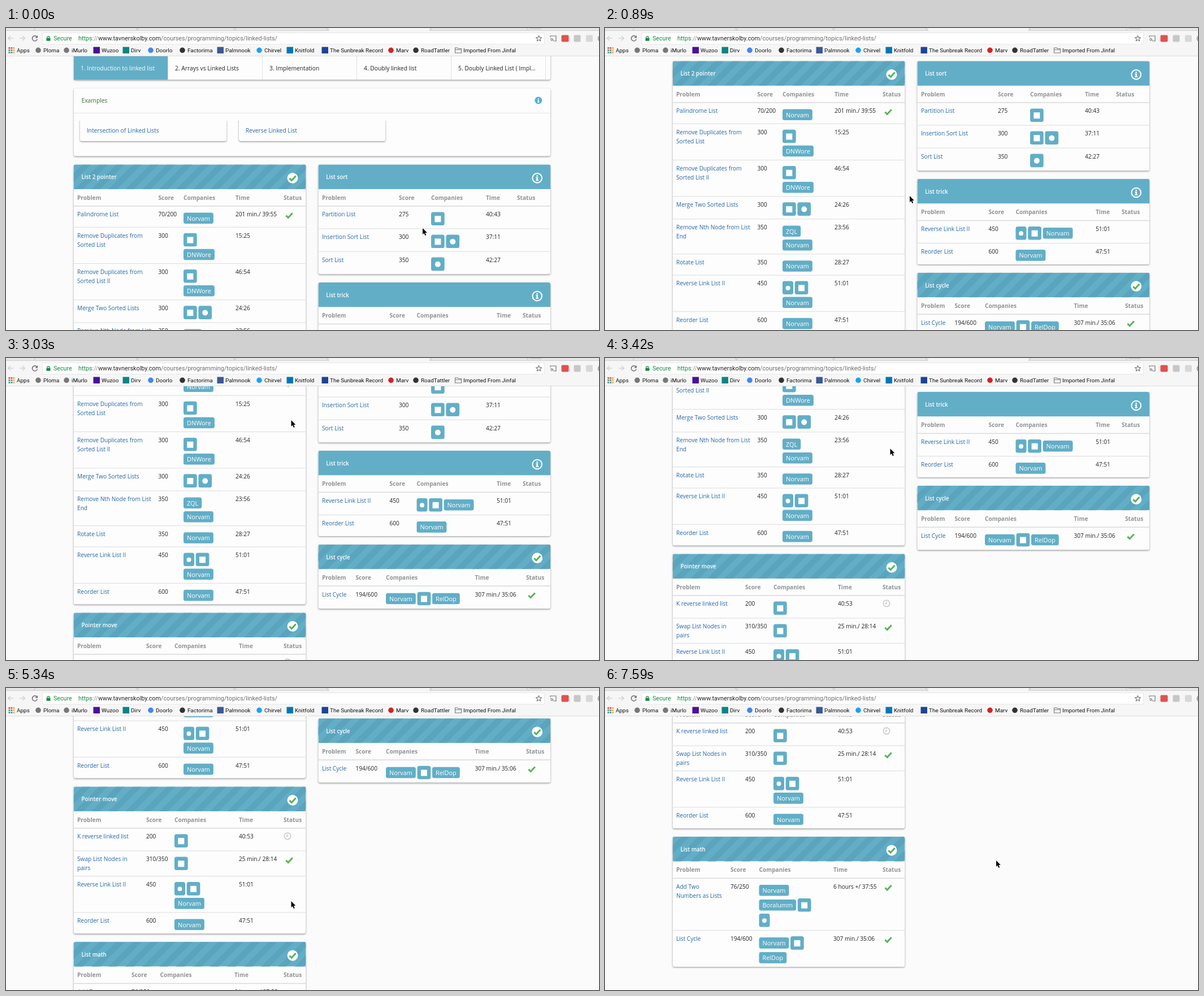
Animation of 1049x534 px, one loop 8000 ms. Source, as an HTML page with a canvas:

```html
<!DOCTYPE html>
<html lang="en">
<head>
<meta charset="utf-8">
<title>Linked lists</title>
<style>
html, body { margin: 0; width: 100%; height: 100%; overflow: hidden; background: #fbfbfb; }
canvas { display: block; width: 1049px; height: 534px; }
</style>
</head>
<body>
<canvas id="stage"></canvas>
<script>
const W = 1049, H = 534, LOOP = 8000;
const BLUE = '#62aec7', DARK = '#5ba4bd', LINK = '#2566a8', INK = '#222', GREEN = '#55b555';
const PAGE = '"Open Sans", "Noto Sans", sans-serif';
const UI = 'Roboto, Inter, sans-serif';

const canvas = document.getElementById('stage');
const c = canvas.getContext('2d', { alpha: false });
const dpr = window.devicePixelRatio || 1;
canvas.width = W * dpr;
canvas.height = H * dpr;

// The picture changes only at these moments
const ticks = [0, 150, 320, 500, 680, 870, 1060, 1240, 1390, 1540, 1690, 1840, 1990,
  2880, 3030, 3240, 3420, 3600, 3780, 3960, 4110, 4260, 4860, 5010,
  5340, 5520, 5715, 5910, 6240, 6390, 6540, 6690, 6840, 6990, 7440, 7590];

// [time, scroll]
const scrollKeys = [[0, 0], [150, 58], [500, 200], [680, 214], [1060, 152], [1990, 152],
  [2880, 212], [3030, 286], [3240, 350], [3420, 390], [3600, 396], [4260, 396],
  [4860, 468], [5010, 532], [5340, 562], [5520, 636], [5715, 702], [5910, 734],
  [6240, 736], [6690, 748]];

// [time, x, y]
const cursorKeys = [[0, 737, 354], [680, 737, 354], [1060, 341, 240], [1990, 504.5, 110],
  [3240, 504.5, 110], [3780, 504.5, 261], [4260, 504.5, 377], [6390, 504.5, 377],
  [6990, 504.5, 283], [7440, 612, 294], [7590, 692, 305]];

function track(keys, t) {
  const i = keys.findIndex(k => k[0] > t);
  if (i < 0) return keys[keys.length - 1].slice(1);
  const a = keys[i - 1], b = keys[i], u = (t - a[0]) / (b[0] - a[0]);
  return a.slice(1).map((v, j) => v + (b[j + 1] - v) * u);
}

// Badges: '#' square icon, 'o' round icon, '.' narrow round icon, '|' new line
const row = (name, score, badges, time, status = '') => ({
  lines: name.split('|'), score, time, status,
  badges: badges.split('|').map(s => s.split(' '))
});
const reverse = badges => row('Reverse Link List II', '450', badges, '51:01');
const reorder = row('Reorder List', '600', 'Norvam', '47:51');
const cycle = badges => row('List Cycle', '194/600', badges, '307 min./ 35:06', 'done');

const left = [
  { title: 'List 2 pointer', done: true, cols: [126, 269.5, 314, 406, 491], rows: [
    row('Palindrome List', '70/200', 'Norvam', '201 min./ 39:55', 'done'),
    row('Remove Duplicates from|Sorted List', '300', '#|DNWore', '15:25'),
    row('Remove Duplicates from|Sorted List II', '300', '#|DNWore', '46:54'),
    row('Merge Two Sorted Lists', '300', '# o', '24:26'),
    row('Remove Nth Node from List|End', '350', 'ZQL|Norvam', '23:56'),
    row('Rotate List', '350', 'Norvam', '28:27'),
    reverse('. #|Norvam'), reorder] },
  { title: 'Pointer move', done: true, cols: [126, 248, 298, 412, 491], rows: [
    row('K reverse linked list', '200', '#', '40:53', 'wait'),
    row('Swap List Nodes in|pairs', '310/350', '#', '25 min./ 28:14', 'done'),
    reverse('. #|Norvam'), reorder] },
  { title: 'List math', done: true, cols: [126, 222, 272.5, 404, 491], rows: [
    row('Add Two|Numbers as Lists', '76/250', 'Norvam|Boralumm #|.', '6 hours +/ 37:55', 'done'),
    cycle('Norvam #|RelDop')] }
];
const right = [
  { title: 'List sort', cols: [559, 695, 752, 849, 904], rows: [
    row('Partition List', '275', '#', '40:43'),
    row('Insertion Sort List', '300', '# o', '37:11'),
    row('Sort List', '350', 'o', '42:27')] },
  { title: 'List trick', cols: [559, 678.5, 726.5, 868, 914], rows: [
    reverse('. # Norvam'), reorder] },
  { title: 'List cycle', done: true, cols: [559, 618.5, 672, 829.5, 920], rows: [
    cycle('Norvam # RelDop')] }
];

function text(s, x, y, color = INK, size = 10.15, weight = 400, family = PAGE) {
  c.font = `${weight} ${size}px ${family}`;
  c.fillStyle = color;
  c.fillText(s, x, y + size * 0.36);
}
function rect(x, y, w, h, color) {
  c.fillStyle = color;
  c.fillRect(x, y, w, h);
}
function round(x, y, w, h, r, color) {
  c.beginPath();
  c.roundRect(x, y, w, h, r);
  c.fillStyle = color;
  c.fill();
}
function disc(x, y, r, color) {
  c.beginPath();
  c.arc(x, y, r, 0, Math.PI * 2);
  c.fillStyle = color;
  c.fill();
}
function ring(x, y, r, color, width) {
  c.beginPath();
  c.arc(x, y, r, 0, Math.PI * 2);
  c.strokeStyle = color;
  c.lineWidth = width;
  c.stroke();
}
function line(points, color, width) {
  c.beginPath();
  points.forEach(([x, y]) => c.lineTo(x, y));
  c.strokeStyle = color;
  c.lineWidth = width;
  c.stroke();
}
function card(x, y, w, h) {
  c.save();
  c.shadowColor = 'rgba(0,0,0,.42)';
  c.shadowBlur = 3 * dpr;
  c.shadowOffsetY = 1.2 * dpr;
  round(x, y, w, h, 3, '#fdfdfd');
  c.restore();
}
function check(x, y, k = 1) {
  line([[x - 5.6 * k, y + 0.2 * k], [x - 1.8 * k, y + 4 * k], [x + 5.8 * k, y - 4.2 * k]], GREEN, 3 * k);
}
function info(x, y, color, k = 1) {
  rect(x - 1.3 * k, y - 5 * k, 2.5 * k, 2.3 * k, color);
  rect(x - 2.3 * k, y - 1.6 * k, 3.5 * k, 1.5 * k, color);
  rect(x - 1.3 * k, y - 1.6 * k, 2.5 * k, 6 * k, color);
  rect(x - 2.5 * k, y + 3.1 * k, 5 * k, 1.6 * k, color);
}
function clock(x, y) {
  ring(x, y, 5.7, '#c2c2c2', 1.4);
  line([[x, y - 3.5], [x, y + 0.5], [x - 3, y + 0.5]], '#c2c2c2', 1.2);
}

const isIcon = s => s.length === 1;
function badge(s, x, y) {
  if (!isIcon(s)) {
    c.font = `400 10.9px ${PAGE}`;
    const w = c.measureText(s).width + 12;
    round(x, y - 9.8, w, 19.6, 3.5, BLUE);
    text(s, x + 6, y + 0.4, '#fff', 10.9);
    return w;
  }
  const w = s === '.' ? 19 : 23.7;
  round(x, y - 11.8, w, 23.6, 3.5, BLUE);
  if (s === '#') rect(x + w / 2 - 5.5, y - 5, 11, 11, '#fff');
  else disc(x + w / 2, y + 0.4, s === 'o' ? 5 : 4, '#fff');
  return w;
}

// Vertical centres of the badge lines, relative to the row top
function badgeLines(badges) {
  let y = 0, prev = false;
  return badges.map((b, i) => {
    const icon = b.some(isIcon);
    if (!i) y = icon ? 22.3 : 21.3;
    else y += icon && prev ? 27 : icon || prev ? 26 : 24.5;
    prev = icon;
    return y;
  });
}
function rowHeight(r) {
  const ys = badgeLines(r.badges), icon = r.badges[ys.length - 1].some(isIcon);
  return Math.max(ys[ys.length - 1] + (icon ? 17.8 : 16), r.lines.length * 16 + 12.6);
}

function drawRow(r, cols, y) {
  r.lines.forEach((s, i) => text(s, cols[0], y + 14.8 + i * 16, LINK));
  text(r.score, cols[1], y + 14.8);
  text(r.time, cols[3], y + 14.8);
  badgeLines(r.badges).forEach((by, i) => {
    let x = cols[2];
    for (const s of r.badges[i]) x += badge(s, x, y + by) + 2.7;
  });
  if (r.status === 'done') check(cols[4] + 10, y + 16.5);
  if (r.status === 'wait') clock(cols[4] + 7, y + 14);
}

function header(p, x, y, w) {
  c.save();
  c.beginPath();
  c.roundRect(x, y, w, 43.5, [3, 3, 0, 0]);
  c.clip();
  rect(x, y, w, 43.5, BLUE);
  if (p.done) {
    for (let s = 15; s < w + 44; s += 30) {
      c.beginPath();
      [[s, 0], [s + 15, 0], [s - 29, 44], [s - 44, 44]].forEach(([a, b]) => c.lineTo(x + a, y + b));
      c.fillStyle = DARK;
      c.fill();
    }
  }
  c.restore();
  text(p.title, x + 13.7, y + 22.3, '#fff', 9.8, 600);
  const ix = x + w - 23.3, iy = y + 24;
  if (p.done) {
    disc(ix, iy, 9.4, '#fff');
    check(ix, iy + 0.2, 0.98);
  } else {
    ring(ix, iy, 8.3, '#fff', 2);
    info(ix, iy, '#fff');
  }
}

function column(panels, x, top) {
  const w = 410.5;
  for (const p of panels) {
    const h = 73.5 + p.rows.reduce((sum, r) => sum + rowHeight(r), 0);
    card(x, top, w, h);
    header(p, x, top, w);
    ['Problem', 'Score', 'Companies', 'Time', 'Status']
      .forEach((s, i) => text(s, p.cols[i], top + 58.5, '#8f9294', 10.15, 700));
    rect(x, top + 72.7, w, 1.5, '#dadada');
    let y = top + 73.5;
    p.rows.forEach((r, i) => {
      if (i) rect(x, y - 0.5, w, 1, '#dcdcdc');
      drawRow(r, p.cols, y);
      y += rowHeight(r);
    });
    top += h + 14.8;
  }
}

function topics() {
  card(120, 20, 843, 71.5);
  rect(120, 20, 166.5, 71.5, BLUE);
  ['1. Introduction to linked list', '2. Arrays vs Linked Lists', '3. Implementation',
    '4. Doubly linked list', '5. Doubly Linked List ( Impl...'].forEach((s, i) => {
    text(s, 132 + i * 167, 71.5, i ? INK : '#fff', 10.3);
    rect(286 + i * 167, 20, 1, 71, '#e2e2e2');
  });
}

function examples() {
  card(120, 107, 843, 119.5);
  text('Examples', 133.5, 128.3, '#3d6b3a', 10.3);
  rect(120, 150, 843, 1, '#e6e6de');
  disc(941.8, 128, 6.4, '#4fb3d6');
  info(941.8, 128.2, '#fff', 0.75);
  [[131, 'Intersection of Linked Lists'], [412, 'Reverse Linked List']].forEach(([x, s]) => {
    c.save();
    c.beginPath();
    c.rect(x - 5, 164, 270, 45);
    c.clip();
    card(x, 155, 259, 45);
    c.restore();
    text(s, x + 11.7, 181.5, LINK, 10.3);
  });
}

const bookmarks = [
  ['Ploma', 66, 'o', '#777'], ['iMurlo', 116, 'o', '#777'], ['Wuzoo', 169, '#', '#4a0f9b'],
  ['Dirv', 221, '#', '#0c8484'], ['Doorlo', 265, 'o', '#4285f4'], ['Factorima', 321, 'o', '#333'],
  ['Palmnook', 388, '#', '#3b5998'], ['Chirvel', 457, 'o', '#1da1f2'], ['Knitfold', 511, '#', '#0077b5'],
  ['The Sunbreak Record', 573, '#', '#1d4596'], ['Marv', 690, 'o', '#d32323'], ['RoadTattler', 734, 'o', '#333']
];

function arrow(x, dir) {
  line([[x - 5 * dir, 18], [x + 4 * dir, 18]], '#d2d2d2', 1.4);
  line([[x, 14], [x + 4.5 * dir, 18], [x, 22]], '#d2d2d2', 1.4);
}

function toolbar() {
  rect(0, 0, W, 50, '#f6f6f6');
  rect(0, 0, W, 4, '#e6e6e6');
  rect(0, 4, W, 1, '#d0d0d0');
  [[51, 231], [234, 403], [406, 568], [752, 922]].forEach(([a, b]) => {
    line([[a - 2, 4], [a + 1, 0]], '#bdbdbd', 1);
    line([[b - 1, 0], [b + 2, 4]], '#bdbdbd', 1);
  });
  rect(572, 0, 177, 5, '#f6f6f6');
  round(926, -2, 22, 4, 2, '#d0d0d0');
  rect(0, 49, W, 1, '#dedede');

  arrow(8, -1);
  arrow(29, 1);
  c.beginPath();
  c.arc(51, 18.3, 4.5, 0.3, 5.4);
  c.strokeStyle = '#666';
  c.lineWidth = 1.5;
  c.stroke();
  c.beginPath();
  [[56, 13], [56, 17.5], [51.5, 17.5]].forEach(([x, y]) => c.lineTo(x, y));
  c.fillStyle = '#666';
  c.fill();

  round(64, 8, 889, 21, 3, '#e0e0e0');
  round(64.7, 8.7, 887.6, 19.6, 2.5, '#fff');
  rect(71.5, 17.5, 7, 5.2, '#128a42');
  c.beginPath();
  c.arc(75, 17, 2.2, Math.PI, 0);
  c.strokeStyle = '#128a42';
  c.lineWidth = 1.2;
  c.stroke();
  let x = 128;
  text('Secure', 84, 18.5, '#128a42', 10.7, 400, UI);
  [['https', '#128a42'], ['://', '#888'], ['www.tavnerskolby.com', '#222'],
    ['/courses/programming/topics/linked-lists/', '#6c6c6c']].forEach(([s, color]) => {
    text(s, x, 18.5, color, 10.8, 400, UI);
    x += c.measureText(s).width;
  });

  c.beginPath();
  for (let i = 0; i < 10; i++) {
    const a = i * Math.PI / 5 - Math.PI / 2, r = i % 2 ? 2.3 : 5.4;
    c.lineTo(942.5 + Math.cos(a) * r, 18.7 + Math.sin(a) * r);
  }
  c.closePath();
  c.strokeStyle = '#555';
  c.lineWidth = 1;
  c.stroke();

  line([[963, 16], [963, 14], [973, 14], [973, 23], [969, 23]], '#777', 1.2);
  [2.5, 5].forEach(r => {
    c.beginPath();
    c.arc(963, 23, r, -Math.PI / 2, 0);
    c.stroke();
  });
  round(982.5, 12.5, 13, 12, 2, '#e0524e');
  round(1004.5, 12.5, 12, 12, 2, '#c6c6c6');
  round(1026, 12.5, 12, 12, 2, '#d8d8d8');
  ring(1053, 18.5, 5.5, '#777', 1.2);

  const dots = ['#e34a3d', '#e34a3d', '#f0a030', '#3fa757', '#4285f4', '#f0b429', '#3fa757', '#4285f4', '#f0b429'];
  dots.forEach((d, i) => rect(4.5 + i % 3 * 4, 34 + Math.floor(i / 3) * 4, 2.8, 2.8, d));
  const label = (s, lx) => text(s, lx, 39.5, '#111', 9.95, 400, UI);
  label('Apps', 19);
  for (const [s, bx, shape, color] of bookmarks) {
    if (shape === '#') rect(bx - 14.5, 33.5, 11.5, 11.5, color);
    else disc(bx - 9, 39.3, 4.8, color);
    label(s, bx);
  }
  c.beginPath();
  [[794.5, 35], [799, 35], [800.3, 36.5], [805.5, 36.5], [805.5, 44], [794.5, 44]]
    .forEach(([px, py]) => c.lineTo(px, py));
  c.closePath();
  c.strokeStyle = '#777';
  c.lineWidth = 1.1;
  c.stroke();
  line([[794.5, 38.3], [805.5, 38.3]], '#777', 1);
  label('Imported From Jinfal', 809);
}

function cursor(x, y) {
  c.beginPath();
  [[0, 0], [0, 11], [2.5, 8.7], [4.4, 13], [6.2, 12.2], [4.4, 8], [7.9, 8]]
    .forEach(([a, b]) => c.lineTo(x + a, y + b));
  c.closePath();
  c.strokeStyle = '#fff';
  c.lineWidth = 1.8;
  c.stroke();
  c.fillStyle = '#000';
  c.fill();
}

function draw(t) {
  const now = ticks.filter(k => k <= t).pop();
  const [scroll] = track(scrollKeys, now);
  c.setTransform(dpr, 0, 0, dpr, 0, 0);
  rect(0, 0, W, H, '#fbfbfb');
  c.save();
  c.translate(0, -scroll);
  topics();
  examples();
  column(left, 119.8, 241.4);
  column(right, 552.5, 241.4);
  c.restore();
  toolbar();
  cursor(...track(cursorKeys, now));
}

const start = performance.now();
function frame() {
  draw((performance.now() - start) % LOOP);
  requestAnimationFrame(frame);
}
frame();
</script>
</body>
</html>
```
